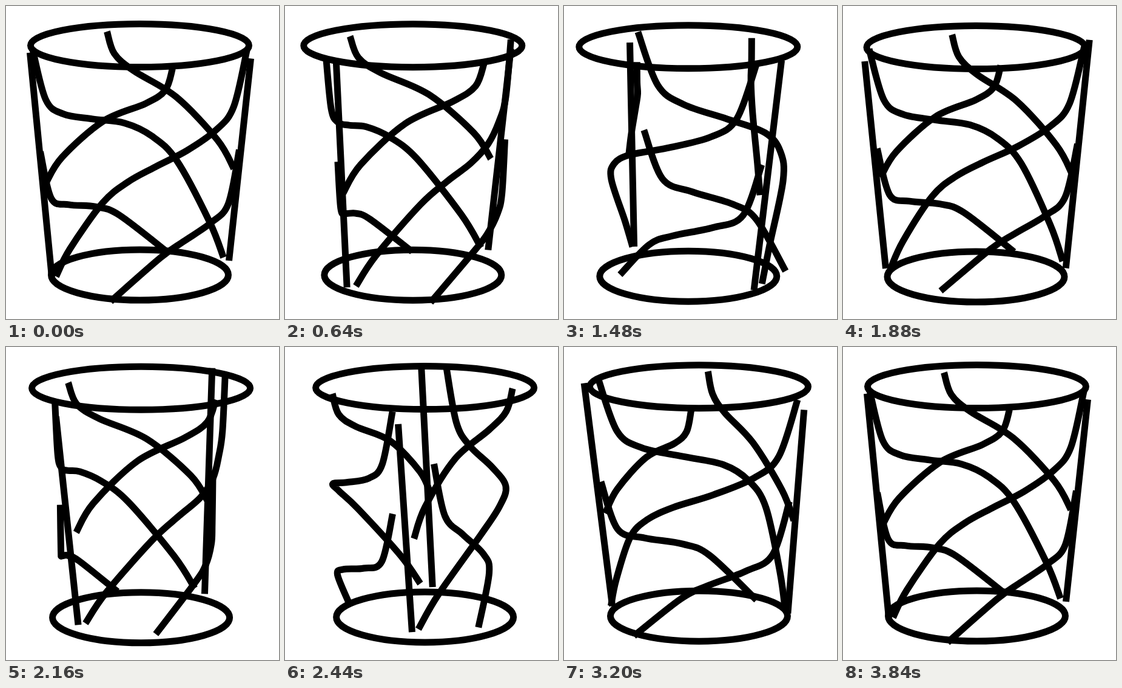
These frames come from a looping animation (450x515 px, 3880 ms). An HTML page with a canvas:

```html
<!DOCTYPE html>
<html lang="en">
<head>
<meta charset="utf-8">
<title>Rotating wire basket</title>
<style>
  html, body { margin: 0; width: 100%; height: 100%; overflow: hidden; background: #fff; }
  canvas { display: block; }
</style>
</head>
<body>
<canvas id="stage" width="450" height="515"></canvas>
<script>
const ctx = document.getElementById('stage').getContext('2d');
const LOOP = 3880, STEP = 40, TURN = 3840;
const TOP = 66, BOTTOM = 443.5;

// Key points: x, screen height on the axis, depth towards the viewer.
const shortStrand = [[-54, 69, -132], [-42, 105, -125], [-10, 130, -106], [60, 166, -70], [128, 231, -41], [155, 276, -31]];
const lowStrand = [[-164, 231, 42], [-146, 313, 17], [-117, 334, -24], [-72, 351, -75], [-34, 371, -98], [48, 438, -107]];
const longStrand = [[-177, 66, 25], [-155, 155, 0], [-126, 186, -33], [-78, 207, -88], [-25, 224, -130],
  [20, 247, -134], [61, 284, -116], [115, 372, -60], [138, 424, -33]];

// Every strand has a twin half a turn away, a little lower and nearer.
const withTwin = (path, nearer) => [path, path.map(([x, y, z]) => [-x, y + 6, nearer - z])];

const wires = [
  [[-181, 64, 70], [-145, 436, 38]],
  [[183, 90, -13], [147, 427, -25]],
  ...withTwin(shortStrand, 13),
  ...withTwin(lowStrand, 45),
  ...withTwin(longStrand, 24)
];

// The view looks down more steeply on lower parts.
const tilt = y => 0.197 + 0.086 * (y - TOP) / (BOTTOM - TOP);

function drawRing(cx, cy, rx, ry) {
  ctx.beginPath();
  ctx.ellipse(cx, cy, rx, ry, 0, 0, 2 * Math.PI);
  ctx.stroke();
}

// Smooth curve through all points (Catmull-Rom as Bezier segments).
function drawCurve(points) {
  const at = i => points[Math.max(0, Math.min(points.length - 1, i))];
  ctx.beginPath();
  ctx.moveTo(...points[0]);
  for (let i = 0; i < points.length - 1; i++) {
    const [a, b, c, d] = [at(i - 1), at(i), at(i + 1), at(i + 2)];
    ctx.bezierCurveTo(
      b[0] + (c[0] - a[0]) / 6, b[1] + (c[1] - a[1]) / 6,
      c[0] - (d[0] - b[0]) / 6, c[1] - (d[1] - b[1]) / 6,
      c[0], c[1]);
  }
  ctx.stroke();
}

function draw(time) {
  const t = Math.floor(time % LOOP / STEP) * STEP;
  const u = Math.min(1, t / TURN);
  const angle = 2 * Math.PI * u * u * (3 - 2 * u);
  const sin = Math.sin(angle), cos = Math.cos(angle);

  // The basket sits slightly off the turning axis, and its rings are not quite round.
  const cx = 220.5 - 13 * sin;
  const dy = 0.5 - 1.5 * cos;
  const ringX = cx - 6 * Math.sin(2 * angle) ** 2;
  const project = ([x, y, z]) => [
    cx + x * cos + z * sin,
    y + dy + tilt(y) * (z * cos - x * sin)
  ];

  ctx.fillStyle = '#fff';
  ctx.fillRect(0, 0, 450, 515);
  ctx.strokeStyle = '#000';
  ctx.lineWidth = 11;
  ctx.lineJoin = 'round';
  drawRing(ringX, TOP + dy, 180, 35.5);
  drawRing(ringX, BOTTOM + dy, 146, 41.5);
  for (const wire of wires) drawCurve(wire.map(project));
  requestAnimationFrame(draw);
}
requestAnimationFrame(draw);
</script>
</body>
</html>
```
